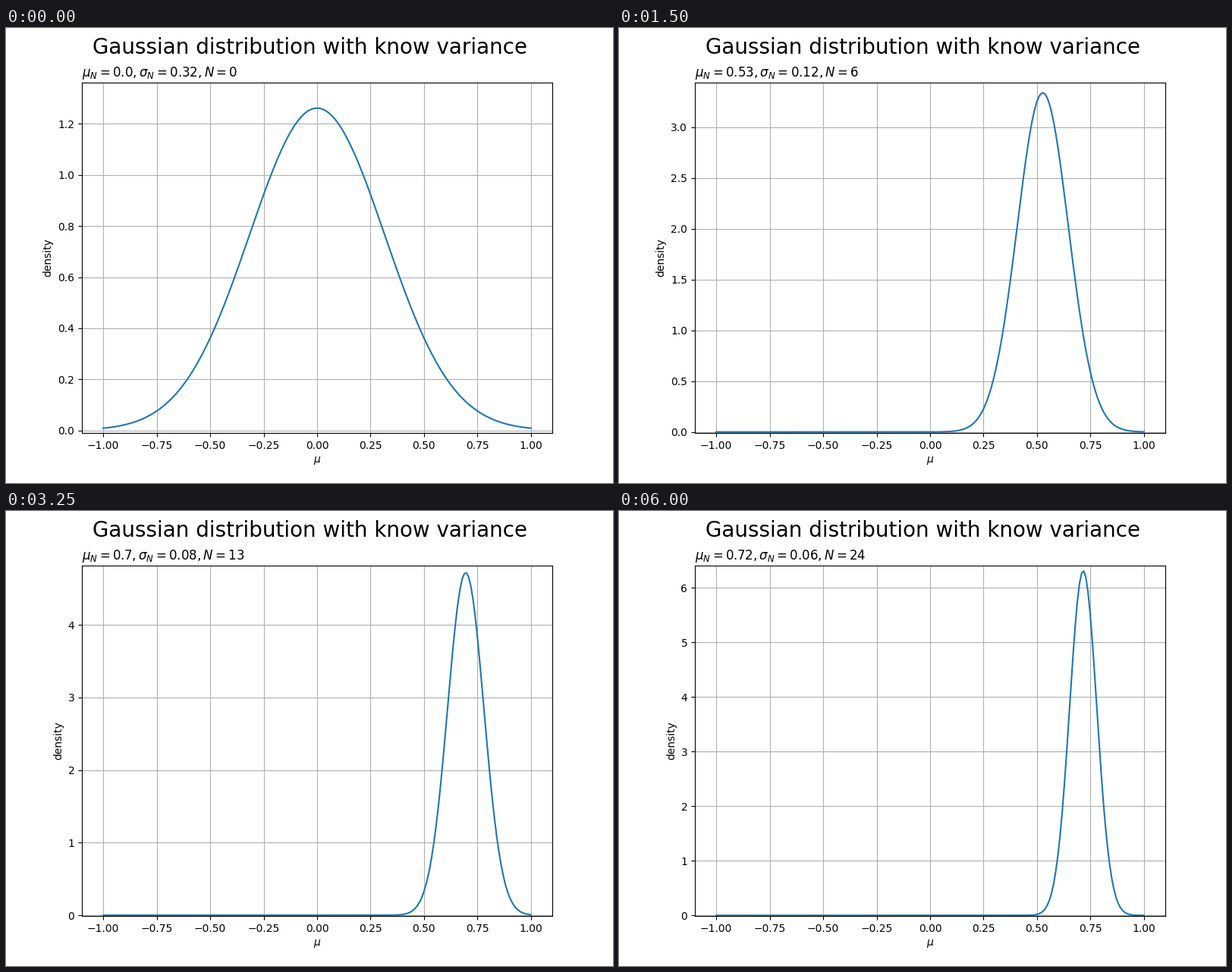
A matplotlib script that plays this animation: 800 px wide and 600 px high, repeating every 6250 ms.

```python
import numpy as np
import matplotlib.pyplot as plt
from matplotlib.animation import FuncAnimation

STEPS = 25
INTERVAL = 250
PRIOR_VAR = 0.1
NOISE_VAR = 0.1

# Posterior mean after a few sample counts; the sample sum grows evenly between.
COUNTS = np.array([0, 2, 6, 10, 16, 20, 24])
MEANS = np.array([0, 0.469, 0.527, 0.686, 0.701, 0.7345, 0.716])
SUMS = MEANS * (COUNTS + NOISE_VAR / PRIOR_VAR)

grid = np.linspace(-1, 1, 200)


def posterior(n):
    precision = 1 / PRIOR_VAR + n / NOISE_VAR
    total = np.interp(n, COUNTS, SUMS)
    return total / NOISE_VAR / precision, precision ** -0.5


def density(x, mean, std):
    return np.exp(-0.5 * ((x - mean) / std) ** 2) / (std * np.sqrt(2 * np.pi))


fig, ax = plt.subplots(figsize=(8, 6), dpi=100)
fig.suptitle("Gaussian distribution with know variance", fontsize=20)


def update(n):
    mean, std = posterior(n)
    curve = density(grid, mean, std)
    ax.clear()
    ax.plot(grid, curve)
    ax.set_ylim(-0.01, curve.max() + 0.1)
    ax.set_title(
        rf"$\mu_N={round(mean, 2)}, \sigma_N={round(std, 2)}, N={n}$", loc="left"
    )
    ax.set_xlabel(r"$\mu$")
    ax.set_ylabel("density")
    ax.grid(True)
    return ax.get_children()


anim = FuncAnimation(fig, update, frames=STEPS, interval=INTERVAL, repeat=True)
plt.show()
```
